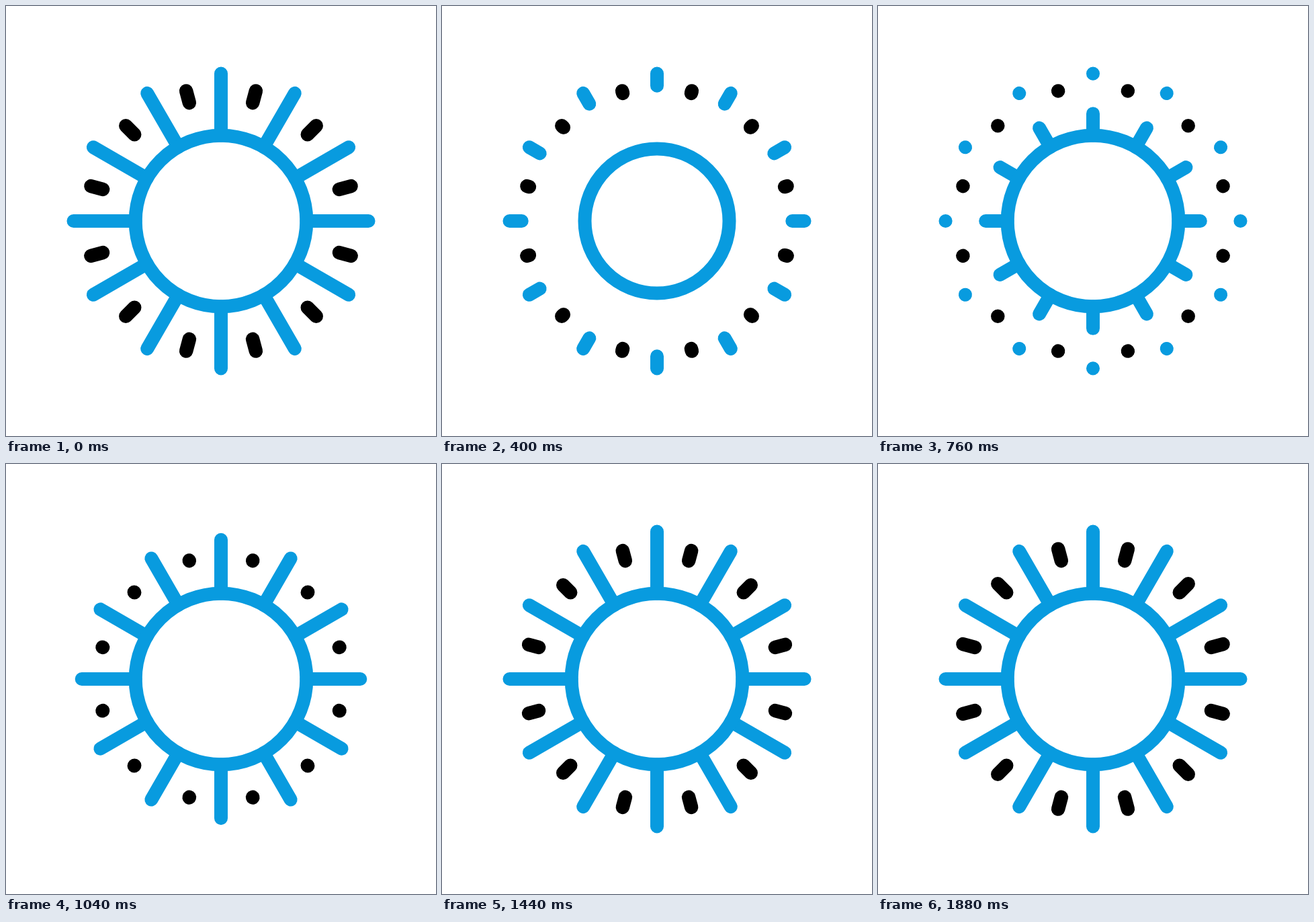
An HTML page with a canvas for the animation above (2.4 s loop, 640 by 640 pixels).

```html
<!DOCTYPE html>
<html>
<head>
<meta charset="utf-8">
<style>
  html, body { margin: 0; height: 100%; overflow: hidden; background: #fff; }
  canvas { display: block; width: 100vw; height: 100vh; }
</style>
</head>
<body>
<canvas width="640" height="640"></canvas>
<script>
const ctx = document.querySelector('canvas').getContext('2d');
const LOOP = 2400, STEP = 40, DURATION = 800, SWAP = 1000;
const BLUE = '#089bdf', BLACK = '#000';
const RING = 127.3;

const clamp = x => Math.min(1, Math.max(0, x));
const mix = (a, b, p) => a + (b - a) * p;
const smooth = x => (1 - Math.cos(Math.PI * clamp(x))) / 2;

// cubic-bezier(.25, .1, .25, 1)
function ease(x) {
  x = clamp(x);
  const curve = (a, b, s) => 3 * (1 - s) ** 2 * s * a + 3 * (1 - s) * s * s * b + s ** 3;
  let lo = 0, hi = 1;
  for (let i = 0; i < 24; i++) {
    const mid = (lo + hi) / 2;
    if (curve(.25, .25, mid) < x) lo = mid; else hi = mid;
  }
  return curve(.1, 1, lo);
}

function spokes(from, to, offset, color, width) {
  ctx.strokeStyle = color;
  ctx.lineWidth = width;
  ctx.beginPath();
  for (let i = 0; i < 12; i++) {
    const a = (i * 30 + offset) * Math.PI / 180;
    const x = Math.cos(a), y = Math.sin(a);
    ctx.moveTo(320 + from * x, 320 + from * y);
    // the tiny extra length keeps the round caps of a collapsed spoke
    ctx.lineTo(320 + (to + .02) * x, 320 + (to + .02) * y);
  }
  ctx.stroke();
}

// Each spoke collapses to its outer end, then grows again from its inner end.
function rays(t, growAt, inner, outer, offset, color, width) {
  if (t < SWAP) spokes(mix(inner, outer, ease(t / DURATION)), outer, offset, color, width);
  if (t >= growAt) {
    spokes(inner, mix(inner, outer, ease((t - growAt) / DURATION)), offset, color, width);
  }
}

function draw(t) {
  ctx.fillStyle = '#fff';
  ctx.fillRect(0, 0, 640, 640);
  ctx.lineCap = 'round';
  rays(t, SWAP, 182.1, 200.4, 15, BLACK, 20.5);
  rays(t, 580, RING, 219.5, 0, BLUE, 20);

  const shrink = t < 400 ? smooth(t / 400) : 1 - smooth((t - 400) / 280);
  ctx.strokeStyle = BLUE;
  ctx.lineWidth = 20;
  ctx.beginPath();
  ctx.arc(320, 320, RING - 19.8 * shrink, 0, 2 * Math.PI);
  ctx.stroke();
}

const start = performance.now();
function tick() {
  const t = (performance.now() - start) % LOOP;
  draw(Math.floor(t / STEP) * STEP);
  requestAnimationFrame(tick);
}
tick();
</script>
</body>
</html>
```
